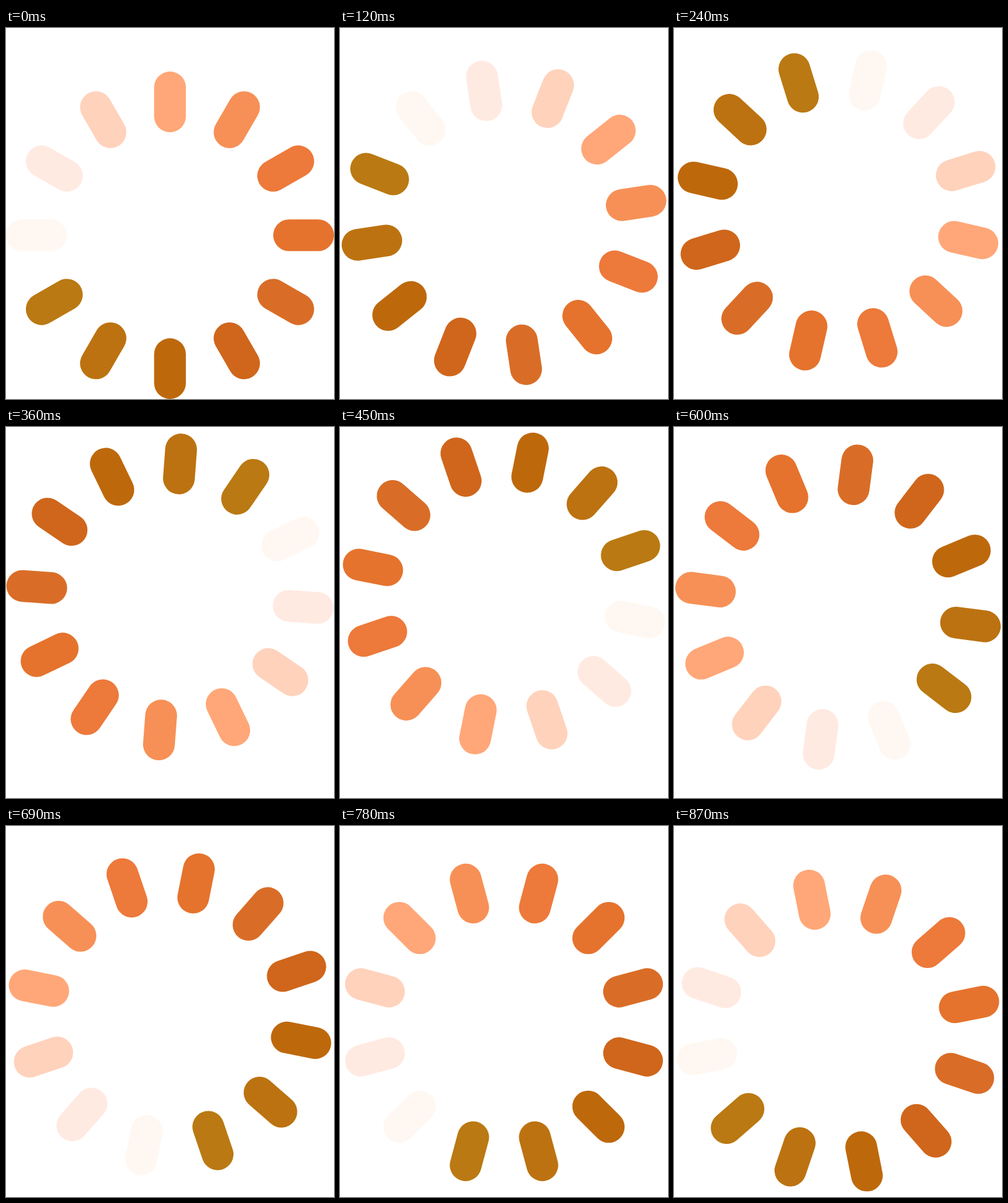
Recreate the animation shown at these times as an HTML page. Size 512x580 px, loop 0.9 s.

```html
<!DOCTYPE html>
<html lang="en">
<head>
<meta charset="utf-8">
<title>Spinner</title>
<style>
  html, body { margin: 0; width: 100%; height: 100%; overflow: hidden; background: #fff; }
  svg { display: block; width: 512px; height: 580px; }
</style>
</head>
<body>
<svg viewBox="0 0 512 580"><g id="wheel"></g></svg>
<script>
  const STEP = 30, STEPS = 30, HALF = 14;
  const TOP = 256, DROP = 68;
  const BAR = { w: 49.6, h: 94.9, outer: 256 };
  // clockwise from twelve o'clock
  const colors = [
    '#ffa778', '#f79056', '#ed793a', '#e5732d', '#d96d27', '#cf661b',
    '#be680c', '#bc7210', '#ba7912', '#fff8f2', '#ffeae1', '#ffd2bc'
  ];
  const wheel = document.getElementById('wheel');

  colors.forEach((fill, i) => {
    const bar = document.createElementNS('http://www.w3.org/2000/svg', 'rect');
    const attrs = {
      x: -BAR.w / 2, y: -BAR.outer, width: BAR.w, height: BAR.h,
      rx: BAR.w / 2, fill, transform: `rotate(${i * 30})`
    };
    for (const key in attrs) bar.setAttribute(key, attrs[key]);
    wheel.append(bar);
  });

  // Half a turn while rising, half a turn while sinking
  function draw(ms) {
    const n = Math.floor(ms / STEP + 1e-6) % STEPS;
    const turn = n < HALF ? n / HALF : 1 + (n - HALF) / (STEPS - HALF);
    const y = TOP + DROP * Math.abs(1 - turn);
    wheel.setAttribute('transform', `translate(256 ${y}) rotate(${turn * 180})`);
  }

  let start;
  function tick(now) {
    start ??= now;
    draw(now - start);
    requestAnimationFrame(tick);
  }
  draw(0);
  requestAnimationFrame(tick);
</script>
</body>
</html>
```
